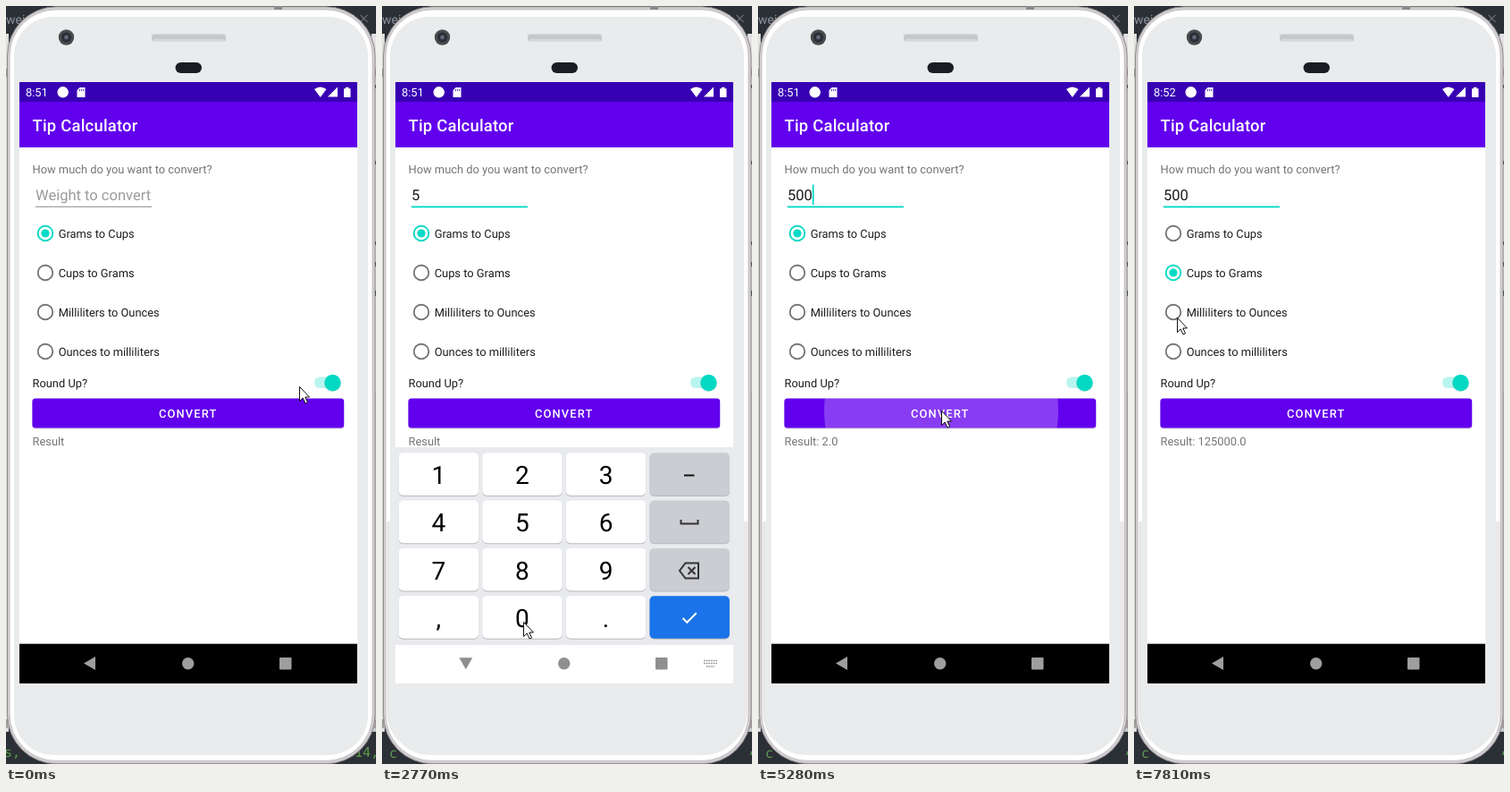
Animation, 414 px wide and 847 px high, one loop 7.99 s. Source, as an HTML page:

```html
<!DOCTYPE html>
<html lang="en">
<head>
<meta charset="utf-8">
<title>Converter demo</title>
<style>
html, body { margin: 0; width: 100%; height: 100%; overflow: hidden; background: #2b2f36; }
svg { display: block; width: 414px; height: 847px; font-family: Roboto, sans-serif; }
text { white-space: pre; text-rendering: geometricPrecision; }
.body { font-size: 12.87px; }
.mono { font: 15px "DejaVu Sans Mono", monospace; fill: #5c9a4c; }
.key { font-size: 28px; text-anchor: middle; }
</style>
</head>
<body>
<svg viewBox="0 0 414 847">
  <defs>
    <clipPath id="screenClip"><rect x="15" y="85" width="378" height="672"/></clipPath>
    <clipPath id="btnClip"><rect x="29.400" y="438.600" width="348.800" height="32.800" rx="3.500"/></clipPath>
  </defs>

  <!-- desktop behind the phone -->
  <rect width="414" height="847" fill="#2b2f36"/>
  <rect y="31" width="3" height="780" fill="#dedcdd"/>
  <rect x="409" y="31" width="5" height="400" fill="#e4e2e4"/>
  <rect x="409" y="430" width="5" height="381" fill="#c6c5c8"/>
  <text x="0" y="20" font-size="14" fill="#8e949c">wei</text>
  <path d="M396.500 10l8 8m0-8l-8 8" stroke="#666b70" stroke-width="1.200"/>
  <g id="codeA" class="mono"><text x="-2" y="839">s,</text><text x="390" y="839">14,</text></g>
  <g id="codeB" class="mono"><text x="8" y="840">c</text><text x="409" y="835">,</text></g>

  <!-- phone -->
  <path d="M1 70v9M1 797v10M413 70v9M413 797v10" stroke="#a39da0" stroke-width="3"/>
  <rect x="1.500" y=".800" width="411.500" height="846" rx="55" fill="#d2ced1" stroke="#8b8588"/>
  <rect x="4" y="4" width="406" height="839.500" rx="52" fill="#fff" stroke="#b8b3b6" stroke-width=".8"/>
  <path d="M413.500 88v4M413.500 173v4M413.500 263v4M413.500 286v5M413.500 318v6" stroke="#55545a"/>
  <path d="M300 2h9" stroke="#8e898c" stroke-width="4"/>
  <path id="sides" d="M5 576h6v211q0 20 10 36q-16-14-16-36zM409 576h-6v211q0 20-10 36q16-14 16-36z" fill="#e9e9ea"/>
  <rect x="9" y="12" width="396" height="825" rx="44" fill="#e9ebec"/>
  <circle cx="67.500" cy="35" r="8.700" fill="#484b4f"/>
  <circle cx="67.500" cy="35" r="5.500" fill="#2b2e34"/>
  <circle cx="67.500" cy="35" r="2.400" fill="#60697a"/>
  <rect x="163" y="31.500" width="83" height="8" rx="3" fill="#c6c8ca"/>
  <path d="M165 38h79" stroke="#dcdee0" stroke-width="1.500"/>
  <rect x="189.500" y="63" width="29.500" height="12" rx="6" fill="#1b1c24"/>

  <g clip-path="url(#screenClip)">
    <rect x="15" y="85" width="378" height="672" fill="#fff"/>
    <rect x="15" y="107" width="378" height="51" fill="#6200ee"/>
    <rect x="15" y="85" width="378" height="22" fill="#3700b3"/>
    <g fill="#fff">
      <text id="clock" class="body" x="22" y="101"></text>
      <circle cx="63.700" cy="96.300" r="6.200"/>
      <path d="M82.500 91h6v11h-9v-8zM345 93q6.500-5 13.500 0l-6.700 9zM371 90.500v11h-11zM378 92.300h2v-1.600h3.500v1.600h2v9.700h-7.500z"/>
      <path d="M82.500 93v2M84.600 93v2M86.700 93v2" stroke="#3700b3" stroke-width=".8"/>
      <text x="29.500" y="139.500" font-size="18.400" font-weight="500" letter-spacing=".23">Tip Calculator</text>
    </g>

    <text class="body" x="29.500" y="186.700" fill="#757575">How much do you want to convert?</text>
    <text id="field" x="33" y="217.300" font-size="16.550"></text>
    <rect id="line" x="33" width="130"/>
    <rect id="caret" y="199.500" width="1.800" height="22.500" fill="#03dac5"/>
    <circle id="radioRipple" fill="#000" fill-opacity=".12"/>
    <g id="radios"></g>
    <text class="body" x="29.500" y="425.700" fill="#1c1c1c">Round Up?</text>
    <rect x="345" y="414.500" width="28" height="12.500" rx="6.250" fill="#b9f4ee"/>
    <circle cx="365.500" cy="421.600" r="9.500" fill="#000" opacity=".12"/>
    <circle cx="365.500" cy="421" r="9.200" fill="#03d8c3"/>
    <rect x="29.400" y="439.400" width="348.800" height="33" rx="4" fill="#000" opacity=".16"/>
    <rect x="29.400" y="438.600" width="348.800" height="32.800" rx="3.500" fill="#6200ee"/>
    <circle id="btnRipple" clip-path="url(#btnClip)" fill="#fff"/>
    <text x="171" y="460" font-size="12.870" font-weight="500" letter-spacing="1.150" fill="#fff">CONVERT</text>
    <text id="result" class="body" x="29.500" y="491" fill="#757575"></text>

    <!-- the black bar lies under the fading keyboard window -->
    <rect x="15" y="712.700" width="378" height="45"/>
    <g id="ime">
      <rect x="15" y="712.700" width="378" height="45" fill="#fff"/>
      <g id="board"><rect x="15" y="493" width="378" height="221" fill="#e8eaed"/></g>
    </g>
    <g id="nav">
      <path id="back" d="M-6.800 0L6.200-7.500V7.500z"/>
      <circle cx="203.700" cy="734.700" r="6.700"/>
      <rect x="306" y="728" width="13.500" height="13.500" rx="1"/>
      <path id="imeIcon" d="M360 731.500h15M360 734.500h15M363 738h9" fill="none" stroke-width="1.700" stroke-dasharray="1.700 1"/>
    </g>
  </g>
  <path id="mouse" d="M.5.500V16.500L4.200 13L7 19L9.500 17.900L6.800 12H11.500z" fill="#fff" stroke="#111" stroke-linejoin="round"/>
</svg>
<script>
const LOOP = 7990;
const TEAL = '#03dac5';
const $ = id => document.getElementById(id);
const set = (el, attrs) => { for (const k in attrs) el.setAttribute(k, attrs[k]); };

function add(parent, tag, attrs, text) {
  const el = document.createElementNS('http://www.w3.org/2000/svg', tag);
  set(el, attrs);
  if (text) el.textContent = text;
  parent.appendChild(el);
  return el;
}

const smooth = u => u * u * (3 - 2 * u);
const clamp = u => Math.max(0, Math.min(1, u));

// Value of a track [[time, ...values], ...] at time t.
function track(keys, t, ease = u => u) {
  let i = 0;
  while (i < keys.length - 1 && keys[i + 1][0] <= t) i++;
  const a = keys[i], b = keys[i + 1];
  if (!b || t <= a[0]) return a.slice(1);
  const u = ease((t - a[0]) / (b[0] - a[0]));
  return a.slice(1).map((v, k) => v + (b[k + 1] - v) * u);
}

const MOUSE = [
  [50, 328, 425], [660, 93, 211], [1240, 93, 211], [1880, 156, 584], [2240, 157, 584],
  [2560, 157, 701], [2700, 158, 688], [3180, 158, 688], [3650, 328, 684], [3900, 328, 684],
  [4320, 232, 456], [4620, 208, 420], [4860, 205, 452], [5460, 205, 452], [6080, 35, 294],
  [6320, 35, 294], [6670, 189, 445], [7120, 189, 445], [7510, 89, 369], [7780, 48, 348]
];
const BOARD_Y = [[1100, 150], [1180, 83], [1240, 35], [1300, 12], [1400, 0], [3780, 0], [3870, 13], [3930, 40], [4060, 150]];
const BOARD_A = [[1100, .3], [1180, .69], [1290, 1], [3800, 1], [3870, .75], [4060, 0]];
const TURN = [[1180, 0], [1400, -90], [3890, -90], [4140, 0]];
const PRESSES = [['5', 2040], ['0', 2780], ['0', 2930], ['ok', 3680]];

const radios = ['Grams to Cups', 'Cups to Grams', 'Milliliters to Ounces', 'Ounces to milliliters'].map((name, i) => {
  const cy = 254 + 44 * i;
  add($('radios'), 'text', { class: 'body', x: 58.700, y: cy + 4.700, fill: '#1c1c1c' }, name);
  return {
    ring: add($('radios'), 'circle', { cx: 44, cy, r: 8.300, fill: 'none', 'stroke-width': 1.850 }),
    dot: add($('radios'), 'circle', { cx: 44, cy, fill: TEAL })
  };
});

const keys = {};
['1', '2', '3', '-', '4', '5', '6', 'space', '7', '8', '9', 'del', ',', '0', '.', 'ok'].forEach((name, i) => {
  const col = i % 4, x = 18.700 + 93.600 * col, y = 499.300 + 53.300 * (i >> 2);
  const fill = name === 'ok' ? '#1a73e8' : col === 3 ? '#cbcdd3' : '#fff';
  const box = { x, width: 89.400, height: 47.600, rx: 5 };
  add($('board'), 'rect', { ...box, y: y + 1, fill: '#b6b9bd' });
  keys[name] = { fill, el: add($('board'), 'rect', { ...box, y, fill }) };
  if (col < 3) add($('board'), 'text', { class: 'key', x: x + 44.600, y: y + 34.700 }, name);
});
const icon = (d, stroke) => add($('board'), 'path', { d, stroke, fill: 'none', 'stroke-width': 2 });
icon('M338 524.500h11.500', '#111');
icon('M334.500 574v4.500h19v-4.500', '#333');
icon('M339.500 622.500h14.500v17h-14.500l-6.500-8.500zM342.500 627l8 8m0-8l-8 8', '#333');
icon('M336.500 684l4.800 4.800l10.500-10.500', '#fff');

function caretOn(t) {
  if (t < 810) return false;
  const start = t < 2120 ? 810 : t < 2830 ? 2120 : 2880;
  return (Math.min(t, 7810) - start) % 1000 < 500;
}

function drawButton(t) {
  const press = t < 6500 ? { at: 5120, x: 205, y: 452 } : { at: 6760, x: 189, y: 445 };
  const u = t - press.at;
  set($('btnRipple'), {
    cx: press.x, cy: press.y,
    r: 20 + 200 * smooth(clamp(u / 300)),
    opacity: u < 0 ? 0 : .24 * (1 - clamp((u - 260) / 300))
  });
}

function drawRadios(t) {
  const chosen = t < 6240 ? 0 : 1;
  radios.forEach(({ ring, dot }, i) => {
    const on = i === chosen;
    ring.setAttribute('stroke', on ? TEAL : '#757575');
    dot.setAttribute('r', on ? 4.600 * (i ? clamp((t - 6240) / 150) : 1) : 0);
  });
  const u = clamp((t - 6090) / 220);
  set($('radioRipple'), {
    cx: 36 + 8 * u, cy: 295 + 3 * u, r: 8 + 10 * u,
    opacity: t < 6090 ? 0 : 1 - clamp((t - 6330) / 200)
  });
}

function drawBoard(t) {
  const [dy] = track(BOARD_Y, t), [shown] = track(BOARD_A, t);
  const alpha = t < 1100 ? 0 : shown;
  set($('board'), { transform: `translate(0 ${dy})` });
  set($('ime'), { opacity: alpha });
  for (const name in keys) {
    const down = PRESSES.some(([k, at]) => k === name && t >= at && t < at + 110);
    keys[name].el.setAttribute('fill', down ? (name === 'ok' ? '#4a90ee' : '#d3d6da') : keys[name].fill);
  }
  const grey = alpha < .5 ? '#9e9e9e' : alpha === 1 ? '#8f8f8f' : t < 2000 ? '#b0b0b0' : '#777';
  set($('nav'), { fill: grey });
  set($('back'), { transform: `translate(93.800 734.500) rotate(${track(TURN, t)[0]})` });
  set($('imeIcon'), { stroke: grey, opacity: t >= 960 && t < 3800 ? 1 : 0 });
}

function draw(t) {
  const value = t < 2120 ? '' : t < 2830 ? '5' : t < 2980 ? '50' : '500';
  const focus = t >= 810;
  $('clock').textContent = t < 5400 ? '8:51' : '8:52';
  $('field').textContent = value || 'Weight to convert';
  set($('field'), { fill: value ? '#1c1c1c' : '#9b9b9b' });
  set($('line'), { y: focus ? 223.500 : 223.800, height: focus ? 1.900 : 1, fill: focus ? TEAL : '#8a8a8a' });
  set($('caret'), { x: 33.200 + 9.200 * value.length, opacity: caretOn(t) ? 1 : 0 });
  $('result').textContent = t < 5280 ? 'Result' : t < 6900 ? 'Result: 2.0' : 'Result: 125000.0';
  const later = t >= 1120;
  set($('codeA'), { opacity: later ? 0 : 1 });
  set($('codeB'), { opacity: later ? 1 : 0 });
  set($('sides'), { opacity: later ? 1 : 0 });
  drawButton(t);
  drawRadios(t);
  drawBoard(t);
  const [x, y] = track(MOUSE, t, smooth);
  set($('mouse'), { transform: `translate(${x} ${y})` });
}

const begin = performance.now();
function tick(now) {
  draw(Math.max(0, now - begin) % LOOP);
  requestAnimationFrame(tick);
}
draw(0);
requestAnimationFrame(tick);
</script>
</body>
</html>
```
